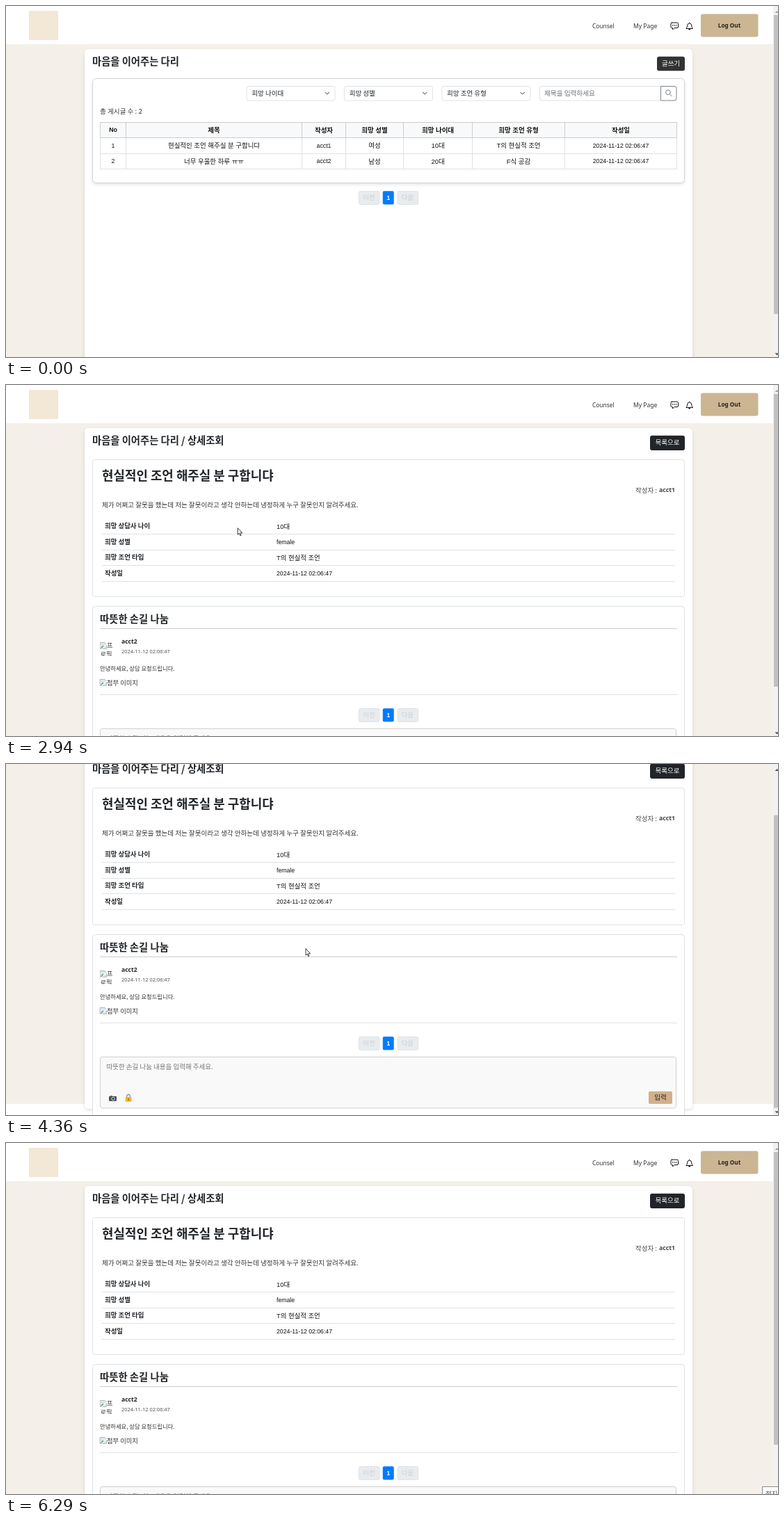
Recreate the animation shown at these times as an HTML page with a canvas. Size 1110 by 505 pixels, loop 7.03 s.

```html
<!DOCTYPE html>
<html lang="ko">
<head>
<meta charset="utf-8">
<style>
html, body { margin: 0; width: 100%; height: 100%; overflow: hidden; background: #fff; }
canvas { display: block; }
</style>
</head>
<body>
<canvas id="stage" width="1110" height="505"></canvas>
<script>
const W = 1110, H = 505, LOOP = 7030;
const OPEN_AT = 2410, LEAVE_AT = 5100, TIP_AT = 6170;
const ctx = document.getElementById('stage').getContext('2d');

const KR = '"Noto Sans CJK KR", "Noto Sans CJK", "Noto Sans CJK JP", sans-serif';
const ARIAL = '"Liberation Sans", ' + KR;
const UI = '"Noto Sans", ' + KR;
const INK = '#212529';

// Rows of [time, x, y]; the point is the cursor's hot spot.
const CURSOR = [
  [110, 892, 416], [190, 760, 350], [270, 600, 278], [350, 440, 212], [430, 325, 176],
  [510, 256, 168], [590, 240, 180], [700, 262, 202], [800, 292, 207], [870, 293, 207],
  [1200, 311, 202], [1350, 314, 201], [1510, 320, 201], [1660, 322, 201], [1800, 325, 201],
  [1940, 327, 200], [2070, 329, 200], [2800, 329, 201], [2940, 333, 206], [3200, 372, 235],
  [3510, 421, 262], [3630, 430, 266], [4150, 430, 266], [4360, 431, 266], [4560, 432, 266],
  [4700, 470, 284], [4820, 613, 350], [4890, 740, 408], [4960, 870, 456], [5030, 1022, 500],
  [5100, 1060, 520]
];

// Rows of [time, offset].
const SCROLL = [
  [3370, 0], [3440, 6], [3510, 27], [3570, 55], [3630, 73],
  [4360, 73], [4490, 56], [4560, 26], [4630, 7], [4700, 0]
];

function sample(keys, t, i = 1) {
  if (t <= keys[0][0]) return keys[0][i];
  const k = keys.findIndex(row => row[0] > t);
  if (k < 0) return keys[keys.length - 1][i];
  const a = keys[k - 1], b = keys[k];
  return a[i] + (b[i] - a[i]) * (t - a[0]) / (b[0] - a[0]);
}

const isLatin = str => /^[\x20-\x7e]+$/.test(str);

// y is the visual middle of the line; baselines sit on whole pixels.
function text(str, x, y, { size = 9.5, weight = 400, color = INK, font = KR, align = 'left' } = {}) {
  ctx.font = `${weight} ${size}px ${font}`;
  ctx.fillStyle = color;
  ctx.textAlign = align;
  ctx.fillText(str, x, Math.round(y + size * 0.37));
}

function box(x, y, w, h, { r = 3, fill, stroke, shadow } = {}) {
  ctx.save();
  ctx.beginPath();
  ctx.roundRect(x, y, w, h, r);
  if (shadow) {
    ctx.shadowColor = `rgba(0,0,0,${shadow})`;
    ctx.shadowBlur = 5;
    ctx.shadowOffsetY = 2;
  }
  if (fill) { ctx.fillStyle = fill; ctx.fill(); }
  ctx.shadowColor = 'transparent';
  if (stroke) { ctx.lineWidth = 1; ctx.strokeStyle = stroke; ctx.stroke(); }
  ctx.restore();
}

function rect(x, y, w, h, color) {
  ctx.fillStyle = color;
  ctx.fillRect(x, y, w, h);
}

function path(d, x, y, { fill, stroke, width = 1 } = {}) {
  const p = new Path2D(d);
  ctx.save();
  ctx.translate(x, y);
  ctx.lineJoin = ctx.lineCap = 'round';
  if (fill) { ctx.fillStyle = fill; ctx.fill(p); }
  if (stroke) { ctx.strokeStyle = stroke; ctx.lineWidth = width; ctx.stroke(p); }
  ctx.restore();
}

function dot(x, y, r, color) {
  ctx.beginPath();
  ctx.arc(x, y, r, 0, Math.PI * 2);
  ctx.fillStyle = color;
  ctx.fill();
}

function header() {
  rect(0, 0, W, 55, '#fff');
  rect(33, 7, 42, 42, '#f3e7d6');
  text('Counsel', 843, 28.5, { size: 8.4, font: UI, color: '#333' });
  text('My Page', 902, 28.5, { size: 8.5, font: UI, color: '#333' });
  path('M1.5 0H9Q10.5 0 10.5 1.5V6Q10.5 7.5 9 7.5H5L2.5 10V7.5H1.5Q0 7.5 0 6V1.5Q0 0 1.5 0Z', 956, 24,
    { stroke: '#111', width: 1 });
  for (let i = 0; i < 3; i++) dot(958.7 + i * 2.5, 27.8, 0.8, '#111');
  path('M0 8.2Q1.4 6.8 1.5 4Q1.6 1 4.5 .8Q7.4 1 7.5 4Q7.6 6.8 9 8.2ZM4.5 .7V0', 978.2, 24, { stroke: '#111', width: 1 });
  path('M0 0H3Q2.8 1.6 1.5 1.6Q.2 1.6 0 0Z', 981.2, 33, { fill: '#111' });
  box(999, 11.5, 82.5, 33, { fill: '#cbb593' });
  text('Log Out', 1040, 28.3, { size: 8.2, weight: 700, font: UI, align: 'center', color: '#222' });
}

function pager(y) {
  for (const [x, label] of [[507.5, '이전'], [563, '다음']]) {
    box(x, y + 0.5, 29.5, 19, { r: 2, fill: '#e9ecef', stroke: '#dee2e6' });
    text(label, x + 14.5, y + 9.7, { size: 9.4, align: 'center', color: '#c9ced3' });
  }
  box(541.7, y + 0.3, 16, 19.3, { r: 2, fill: '#007bff' });
  text('1', 549.7, y + 10, { size: 9, weight: 700, font: ARIAL, align: 'center', color: '#fff' });
}

function titleBar(title, button, x, h, fill) {
  text(title, 124, 80, { size: 14.3, weight: 700 });
  box(x, 72.7, 976 - x, h, { fill });
  text(button, (x + 976) / 2, 82.8, { align: 'center', color: '#fff' });
}

function listTable() {
  const cols = [135, 172, 425, 488, 571, 670, 803, 964];
  const rows = [
    ['No', '제목', '작성자', '희망 성별', '희망 나이대', '희망 조언 유형', '작성일'],
    ['1', '현실적인 조언 해주실 분 구합니댜', 'acct1', '여성', '10대', 'T의 현실적 조언', '2024-11-12 02:06:47'],
    ['2', '너무 우울한 하루 ㅠㅠ', 'acct2', '남성', '20대', 'F식 공감', '2024-11-12 02:06:47']
  ];
  rect(135, 167, 830, 23, '#f8f9fa');
  [167, 189, 212, 234].forEach((y, i) => rect(135, y, 830, 1, i < 2 ? '#cdcdcd' : '#dfe1e3'));
  for (const x of cols) {
    rect(x, 167, 1, 23, '#cdcdcd');
    rect(x, 190, 1, 45, '#dfe1e3');
  }
  rows.forEach((row, r) => row.forEach((cell, c) => {
    text(cell, (cols[c] + cols[c + 1] + 1) / 2, 178.2 + r * 22.5, {
      size: isLatin(cell) ? 8.75 : 9.45, weight: r ? 400 : 700, font: ARIAL, align: 'center', color: '#111'
    });
  }));
}

function listPage() {
  rect(0, 0, W, H, '#f4f0e9');
  header();
  box(113, 62, 874, 520, { r: 5, fill: '#fff', shadow: 0.12 });
  titleBar('마음을 이어주는 다리', '글쓰기', 936, 20.5, '#333');
  box(124.5, 104.5, 851, 150, { r: 5, fill: '#fff', stroke: '#d3d5d7', shadow: 0.13 });
  ['희망 나이대', '희망 성별', '희망 조언 유형'].forEach((label, i) => {
    const x = 346 + i * 140.4;
    box(x, 115.5, 127, 20.5, { fill: '#fff', stroke: '#dee2e6' });
    text(label, x + 7.3, 125.3);
    path('M0 0L2.8 2.8L5.6 0', x + 113, 124.3, { stroke: '#343a40', width: 1 });
  });
  box(767.5, 115.5, 174, 20.5, { r: [3, 0, 0, 3], fill: '#fff', stroke: '#dee2e6' });
  text('제목을 입력하세요', 774, 125.3, { size: 9.6, color: '#6b7278' });
  box(941.5, 115.5, 22.5, 20.5, { r: [0, 3, 3, 0], fill: '#fff', stroke: '#7b838a' });
  path('M7 3.6A3.4 3.4 0 1 1 .2 3.6A3.4 3.4 0 1 1 7 3.6M6 6.1L9 9.1', 948.4, 120.6, { stroke: '#6c757d', width: 0.9 });
  text('총 게시글 수 : 2', 135, 151.5, { size: 9.6, color: '#333' });
  listTable();
  pager(266);
}

function brokenImage(x, y) {
  path('M0 0H6.5L9 2.5V9H0Z', x + 0.5, y + 0.5, { fill: '#dbe7f6', stroke: '#a9a9a9', width: 0.8 });
  path('M0 4L3 .5L5 2.5L7 0V1.5L2 5H0Z', x + 1.2, y + 4.2, { fill: '#58a55c' });
  path('M0 8L8 1', x + 2, y + 2, { stroke: '#fff', width: 1.3 });
}

function comment() {
  ctx.save();
  ctx.beginPath();
  ctx.rect(135, 369, 18.5, 21);
  ctx.clip();
  brokenImage(135, 370);
  text('프', 145, 375, { size: 9.3, color: '#333' });
  text('로필', 135.5, 387.5, { size: 9.3, color: '#333' });
  ctx.restore();
  text('acct2', 166, 368.7, { size: 8.6, weight: 700, font: UI });
  text('2024-11-12 02:06:47', 166, 383, { size: 7.4, font: UI, color: '#555' });
  text('안녕하세요, 상담 요청드립니다.', 135, 407.7, { size: 8.3, color: '#333' });
  brokenImage(135, 423);
  text('첨부 이미지', 145, 428.5, { size: 9.3, color: '#333' });
  rect(135, 445, 830, 1, '#dfe1e3');
}

function replyForm() {
  box(135.5, 494.5, 828, 73.5, { fill: '#f9f9f9', stroke: '#d0d0d0' });
  text('따뜻한 손길 나눔 내용을 입력해 주세요.', 144.5, 508.8, { color: '#757575' });
  rect(150, 550.3, 3, 1.5, '#555');
  box(148, 551, 11, 7, { r: 1, fill: '#4b5158' });
  dot(154, 554.6, 2.5, '#cfd6dc');
  dot(154, 554.6, 1.5, '#22303c');
  path('M0 4V2.4A2.4 2.4 0 0 1 4.8 2.4V4', 173.6, 548.5, { stroke: '#8d8f93', width: 1.3 });
  box(171.7, 552, 8.8, 7, { r: 1, fill: '#f5b62f' });
  rect(175.5, 554.3, 1.2, 2.6, '#6a4a12');
  box(924, 544, 34, 18, { r: 2, fill: '#d3b08a' });
  text('입력', 941, 552.5, { align: 'center' });
}

function detailPage() {
  rect(0, 0, W, 700, '#fff');
  rect(0, 0, W, 562, '#f4f0e9');
  header();
  box(113, 62, 874, 507, { r: 5, fill: '#fff', shadow: 0.12 });
  titleBar('마음을 이어주는 다리 / 상세조회', '목록으로', 926, 21.3, INK);

  box(124.5, 107.5, 851, 197, { fill: '#fff', stroke: '#dfe2e5' });
  text('현실적인 조언 해주실 분 구합니댜', 138, 130, { size: 17.9, weight: 700 });
  text('acct1', 962, 151, { size: 8.75, weight: 700, font: UI, align: 'right', color: '#444' });
  text('작성자 :', 936, 151, { align: 'right', color: '#444' });
  text('제가 어쩌고 잘못을 했는데 저는 잘못이라고 생각 안하는데 냉정하게 누구 잘못인지 알려주세요.', 138, 172.2,
    { size: 9.55, color: '#333' });
  [
    ['희망 상담사 나이', '10대'],
    ['희망 성별', 'female'],
    ['희망 조언 타입', 'T의 현실적 조언'],
    ['작성일', '2024-11-12 02:06:47']
  ].forEach(([label, value], i) => {
    const y = 203 + i * 22.45;
    text(label, 142, y, { size: 9.45, weight: 700 });
    text(value, 389, y + 0.3, { size: isLatin(value) ? 8.7 : 9.4, font: ARIAL, color: '#111' });
    rect(138, Math.round(y + 11.4), 824, 1, '#dee2e6');
  });

  box(124.5, 318.5, 851, 320, { r: 4, fill: '#fff', stroke: '#dcdfe2' });
  text('따뜻한 손길 나눔', 135, 337, { size: 14.35, weight: 700 });
  rect(135, 350, 830, 1, '#cdcdcd');
  comment();
  pager(465);
  replyForm();
}

function scrollbar(offset, thumb) {
  rect(1103, 0, 7, H, '#f1f1f1');
  rect(1104, 13 + offset * 0.83, 6, thumb, '#c1c1c1');
  path('M0 3L3 0L6 3Z', 1105.5, 7, { fill: offset ? '#505050' : '#a3a3a3' });
  path('M0 0L3 3L6 0Z', 1105.5, 499.5, { fill: '#505050' });
}

function cursor(t) {
  if (t < CURSOR[0][0] || t >= LEAVE_AT) return;
  const x = sample(CURSOR, t), y = sample(CURSOR, t, 2);
  if (t >= 800 && t < OPEN_AT) {
    path('M-1 1Q0-.6 1 1V5Q2.2 4 3 5.2Q4.2 4.5 5 5.8Q6.4 5.4 6.4 7V10L5 13.5H-.8L-3.8 9.5Q-4.4 7.8-2.8 7.8L-1 9.2Z', x, y,
      { fill: '#fff', stroke: '#222', width: 0.9 });
    path('M1 5V7.5M3 5.4V7.7M5 6V8', x, y, { stroke: '#222', width: 0.6 });
  } else {
    path('M0 0V9.2L2.1 7.3L3.6 10.7L5 10L3.5 6.8H6.2Z', x, y, { fill: '#fff', stroke: '#222', width: 0.9 });
  }
}

function tooltip() {
  box(1087.5, 494.5, 40, 20, { r: 0, fill: '#fff', stroke: '#8a8a8a' });
  text('정지', 1092, 504, { size: 9.5, color: '#555' });
}

function draw(now) {
  const t = now % LOOP;
  const detail = t >= OPEN_AT;
  const offset = detail ? Math.round(sample(SCROLL, t)) : 0;
  ctx.clearRect(0, 0, W, H);
  ctx.save();
  ctx.translate(0, -offset);
  if (detail) detailPage(); else listPage();
  ctx.restore();
  scrollbar(offset, detail ? 421 : 430);
  cursor(t);
  if (t >= TIP_AT) tooltip();
}

const start = performance.now();
function tick() {
  draw(performance.now() - start);
  requestAnimationFrame(tick);
}
tick();
</script>
</body>
</html>
```
